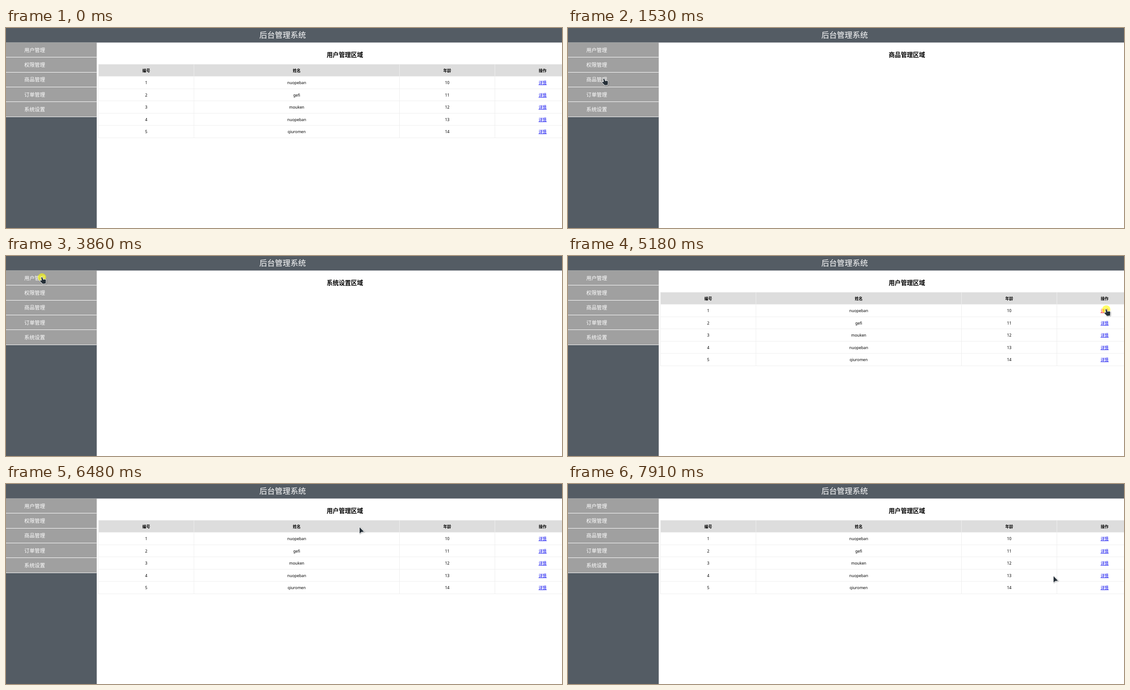
These frames come from a looping animation (1247x449 px, 8 s). An HTML page with a canvas:

```html
<!DOCTYPE html>
<html lang="zh-CN">
<head>
<meta charset="utf-8">
<style>
html, body { margin: 0; width: 100%; height: 100%; overflow: hidden; background: #fff; }
canvas { display: block; }
</style>
</head>
<body>
<canvas id="stage" width="1247" height="449"></canvas>
<script>
const ctx = document.getElementById('stage').getContext('2d');
const FONT = '"Noto Sans", "Noto Sans CJK SC", "Noto Sans CJK", sans-serif';
const DARK = '#545c64', LINE = '#eee';
const HOME = '用户管理';
const MENU = [HOME, '权限管理', '商品管理', '订单管理', '系统设置'];
const NAMES = ['nuopeban', 'gefi', 'mouken', 'nuopeban', 'qiuromen'];
const HEADS = ['编号', '姓名', '年龄', '操作'];

// Layout
const SIDE = 203.5, MENU_STEP = 33.33;
const menuEdge = i => Math.round(32 + MENU_STEP * i);
const TABLE_TOP = 81.5, ROW = 27.5, NARROW = 214, WIDE = 461;
const colEdge = i => 207.5 + NARROW * i + (i > 1 ? WIDE - NARROW : 0);
const colCenter = i => (colEdge(i) + colEdge(i + 1)) / 2;
const rowCenter = i => TABLE_TOP + (i + 1.5) * ROW + 0.2;
const LINK_X = colCenter(3);
const PAGE_X = 760;

// The screen refreshes once per tick, after a short still start.
const LOOP = 8000, STILL = 200, TICK = 110, HOLD = 2;

const menuSpot = i => [80, 48 + 33 * i];
const linkSpot = i => [LINK_X + 3, rowCenter(i) - 3];
const BACK = [778, 93];

// Each visit ends its travel at a tick; if it opens a page, the button is held from there.
const visits = [];
function visit(tick, spot, travel, opens) {
  visits.push({ tick, spot, travel, opens });
}
visit(0, [119, 275], 0);
for (let i = 1; i < MENU.length; i++) visit(5 * i - 1, menuSpot(i), 2, MENU[i]);
visit(28, menuSpot(0), 6.2);
visit(32, menuSpot(0), 0, HOME);
visit(41, [888, 165], 5);
visit(45, linkSpot(0), 3, 1);
visit(51, BACK, 3, HOME);
visit(57, [793, 97], 1);
visit(58, [1212, 165], 1);
visit(62, linkSpot(2), 2, 3);
visit(67, BACK, 3, HOME);
visit(70, [1089, 207], 1);

const easeOut = u => 1 - (1 - u) ** 3;

function pointerAt(tick) {
  const i = visits.findLastIndex(v => v.tick - v.travel <= tick);
  const { spot, travel, tick: end } = visits[i];
  if (tick >= end) return spot;
  const from = visits[i - 1].spot;
  const k = easeOut((tick - end + travel) / travel);
  return spot.map((p, axis) => from[axis] + (p - from[axis]) * k);
}

function rect(x, y, w, h, color) {
  ctx.fillStyle = color;
  ctx.fillRect(x, y, w, h);
}

function text(str, x, centerY, size, color = '#000', weight = 400, align = 'center') {
  ctx.font = `${weight} ${size}px ${FONT}`;
  ctx.textAlign = align;
  ctx.fillStyle = color;
  ctx.fillText(str, x, centerY + size * 0.38);
}

function drawFrame() {
  const menuEnd = menuEdge(MENU.length);
  rect(0, 0, 1247, 449, '#fff');
  rect(0, 0, 1247, 32.6, DARK);
  rect(0, menuEnd, SIDE, 449, DARK);
  text('后台管理系统', 620.5, 15.5, 17.45, '#fff');
  rect(0, 32.6, SIDE, menuEnd - 32.6, '#a0a0a0');
  MENU.forEach((label, i) => {
    rect(0, menuEdge(i + 1), SIDE, 1, '#fff');
    text(label, 41, 49.3 + MENU_STEP * i, 11.65, '#fff', 400, 'left');
  });
}

function drawTable(activeRow) {
  rect(colEdge(0), TABLE_TOP, 1247, ROW, '#ddd');
  for (let i = 0; i < 7; i++) rect(207, Math.round(TABLE_TOP + i * ROW - 0.6), 1040, 1, LINE);
  for (let i = 0; i < 4; i++) rect(colEdge(i) - 0.5, TABLE_TOP - 0.5, 1, ROW * 6, LINE);
  HEADS.forEach((label, i) => text(label, colCenter(i), 95.4, 8.8, '#000', 700));
  NAMES.forEach((name, i) => {
    const y = rowCenter(i);
    const color = i === activeRow ? '#f00' : '#00e';
    [i + 1, name, i + 10].forEach((cell, c) => text(cell, colCenter(c), y, 8.8));
    text('详情', LINK_X, y, 8.8, color);
    rect(LINK_X - 9, Math.round(y + 4.2), 18, 1, color);
  });
}

function drawDetail(id) {
  text(`用户详情页 --- 用户Id为：${id}`, PAGE_X, 58.8, 9.7, '#000', 700);
  rect(PAGE_X - 24, 81, 48, 22, '#87cefa');
  rect(PAGE_X - 23, 82, 46, 20, '#ecf5ff');
  text('后退', PAGE_X, 92, 8.8);
}

const HAND = new Path2D('M-1 0L1.2-.6L3.4 5L8 4.4L9.6 6L9.2 13.8L2.4 14.6L-3.4 8.4L-2.8 6.6L.2 7.6Z');
const ARROW = new Path2D('M0 0V14L3.6 11L9.8 10Z');

function drawPointer(x, y, shape) {
  ctx.save();
  ctx.translate(x, y);
  ctx.lineJoin = 'round';
  ctx.lineWidth = 2;
  ctx.strokeStyle = '#fff';
  ctx.shadowColor = 'rgba(0,0,0,.4)';
  ctx.shadowBlur = 2;
  ctx.shadowOffsetX = ctx.shadowOffsetY = 0.8;
  ctx.stroke(shape);
  ctx.shadowColor = 'transparent';
  ctx.fillStyle = '#263038';
  ctx.fill(shape);
  ctx.restore();
}

function drawPress(x, y) {
  ctx.fillStyle = 'rgba(255,255,0,.6)';
  ctx.beginPath();
  ctx.arc(x + 0.7, y, 9.3, 0, Math.PI * 2);
  ctx.fill();
}

function render(time) {
  const tick = Math.floor((time % LOOP - STILL) / TICK);
  const clicks = visits.filter(v => v.opens);
  const page = clicks.findLast(v => v.tick + HOLD <= tick)?.opens ?? HOME;
  const pressed = clicks.some(v => v.tick <= tick && tick < v.tick + HOLD);
  const [x, y] = tick < 0 ? [0, 0] : pointerAt(tick);
  const row = Math.floor((y - TABLE_TOP) / ROW) - 1;
  const overMenu = x < SIDE && y > menuEdge(0) && y < menuEdge(MENU.length);
  const overLink = page === HOME && Math.abs(x - LINK_X) < 9 && row >= 0 && row < NAMES.length;

  drawFrame();
  if (typeof page === 'number') drawDetail(page);
  else text(page + '区域', PAGE_X, 59.6, 13.6, '#000', 700);
  if (page === HOME) drawTable(overLink && pressed ? row : -1);
  if (tick < 0) return;
  if (pressed) drawPress(x, y);
  drawPointer(x, y, overMenu || overLink ? HAND : ARROW);
}

const start = performance.now();
function loop() {
  render(performance.now() - start);
  requestAnimationFrame(loop);
}
loop();
</script>
</body>
</html>
```
